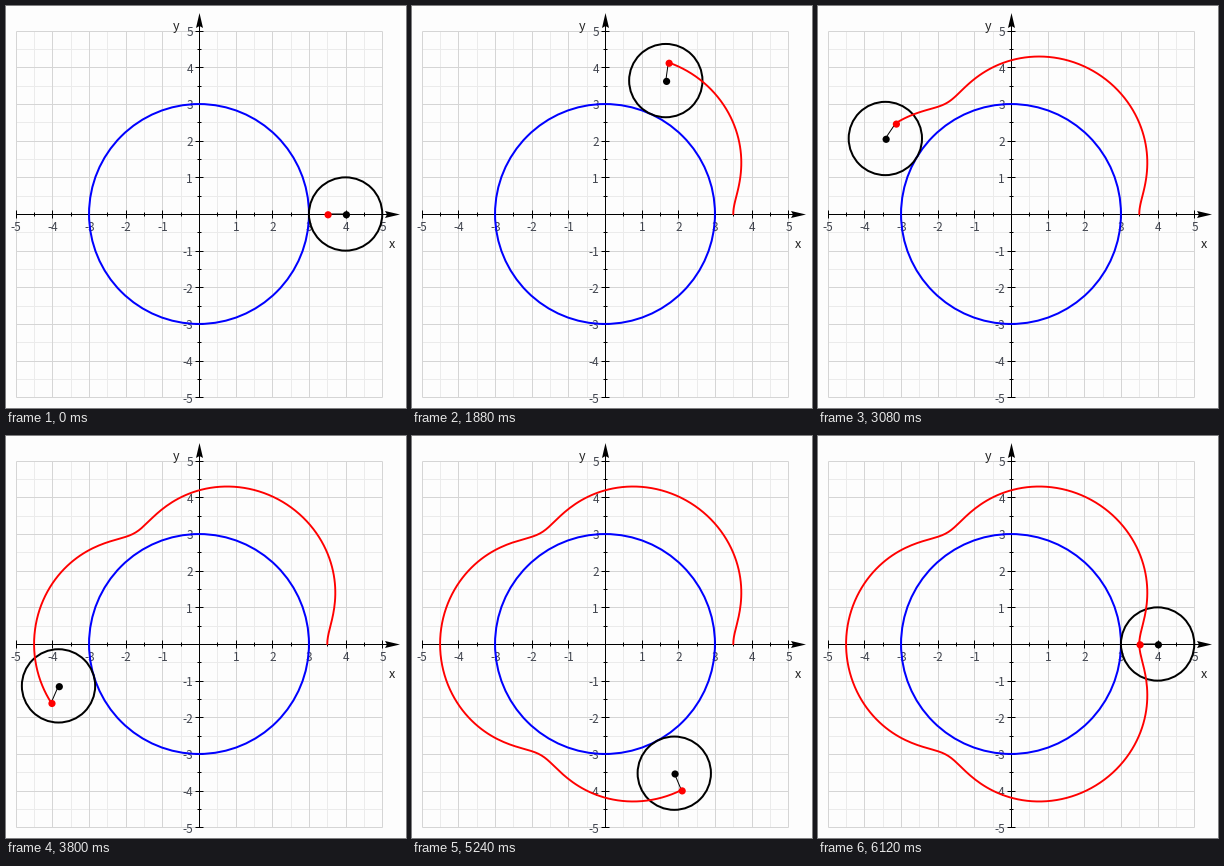
Write a matplotlib script that moves like this. It is 400 px wide and 402 px high and loops after 8120 ms.

```python
import numpy as np
import matplotlib.pyplot as plt
from matplotlib.animation import FuncAnimation
from matplotlib.patches import Circle, Polygon

W, H, DPI = 400, 402, 64
PX = 72 / DPI                      # points per pixel
CX, CY, UNIT = 193, 208, 36.65
DOT_SHIFT = 0.8                    # dots sit slightly right of and below the curves
BIG, SMALL, ARM = 3, 1, 0.5
STEP_MS, HOLD_MS, STEPS = 80, 1000, 65
TICK_MS, LOOP_MS = 40, 8120

# rolling angle in degrees against step; the speed wavers slightly
KNOT_STEPS = [0, 12, 27, 36, 46, 54, 65]
KNOT_ANGLES = [0, 65.5, 149.0, 196.6, 254.6, 298.2, 360]

plt.rcParams["font.family"] = "Noto Sans CJK JP"
fig = plt.figure(figsize=(W / DPI, H / DPI), dpi=DPI, facecolor="#fdfdfd")
ax = fig.add_axes([0, 0, 1, 1])
ax.set_xlim(0, W)
ax.set_ylim(H, 0)
ax.axis("off")


def to_px(x, y):
    return CX + UNIT * x, CY - UNIT * y


def line(x0, y0, x1, y1, color, z):
    # snapping moves whole-pixel positions to the pixel's centre
    ax.plot([x0, x1], [y0, y1], color=color, lw=PX, zorder=z, snap=True,
            solid_capstyle="butt")


def label(x, base, text, size=11.8, ha="center", color="#40444e"):
    ax.text(x, base, text, fontsize=size * PX, ha=ha, va="baseline",
            color=color, zorder=4)


def ring(radius, color, z):
    return ax.add_patch(Circle((CX, CY), radius * UNIT, fill=False,
                               ec=color, lw=2 * PX, zorder=z))


def dot(color, z):
    return ax.add_patch(Circle((0, 0), 3.6, fc=color, lw=0, zorder=z))


def draw_plane():
    left, top = to_px(-5, 5)
    right, bottom = to_px(5, -5)
    for n in range(-10, 11):
        major = n % 2 == 0
        x, y = to_px(n / 2, n / 2)
        color, z = ("#d5d5d5", 2) if major else ("#ebebeb", 1)
        line(x, top, x, bottom, color, z)
        line(left, y, right, y, color, z)
        if n:
            size = 4 if major else 2
            line(x, CY - size, x, CY + size, "black", 3)
            line(CX - size, y, CX + size, y, "black", 3)
        if major and n:
            label(x + 0.3, 225, str(n // 2))
            label(187, y + 5.3, str(n // 2), ha="right")
    line(left, CY, 385, CY, "black", 3)
    line(CX, bottom, CX, 15, "black", 3)
    mx, my = CX + 0.5, CY + 0.5
    for head in ([(394, my), (379, my - 3.5), (381, my), (379, my + 3.5)],
                 [(mx, 7), (mx - 3.5, 22), (mx, 20), (mx + 3.5, 22)]):
        ax.add_patch(Polygon(head, fc="black", lw=0, zorder=3))
    label(386.2, 241.7, "x", 12.6, color="#222222")
    label(169.8, 24.3, "y", 12.6, color="#222222")


def pen(t):
    k = BIG + SMALL
    turn = k / SMALL * t
    return to_px(k * np.cos(t) - ARM * np.cos(turn),
                 k * np.sin(t) - ARM * np.sin(turn))


draw_plane()
ring(BIG, "#0000ff", 5)
wheel = ring(SMALL, "black", 6)
trail, = ax.plot([], [], color="#ff0000", lw=1.9 * PX, zorder=7)
arm, = ax.plot([], [], color="black", lw=PX, snap=False, zorder=8)
hub = dot("black", 9)
tip = dot("#ff0000", 10)


def update(i):
    ms = i * TICK_MS
    step = 0 if ms < HOLD_MS else min(STEPS, (ms - HOLD_MS) // STEP_MS + 1)
    t = np.radians(np.interp(step, KNOT_STEPS, KNOT_ANGLES))
    center = to_px((BIG + SMALL) * np.cos(t), (BIG + SMALL) * np.sin(t))
    end = pen(t)
    wheel.center = center
    hub.center = np.add(center, DOT_SHIFT)
    tip.center = np.add(end, DOT_SHIFT)
    arm.set_data([center[0], end[0]], [center[1], end[1]])
    trail.set_data(*pen(np.linspace(0, t, 4 * step + 2)))
    return wheel, trail, arm, hub, tip


anim = FuncAnimation(fig, update, frames=LOOP_MS // TICK_MS, interval=TICK_MS,
                     init_func=lambda: update(0), repeat=True, repeat_delay=0)
plt.show()
```
